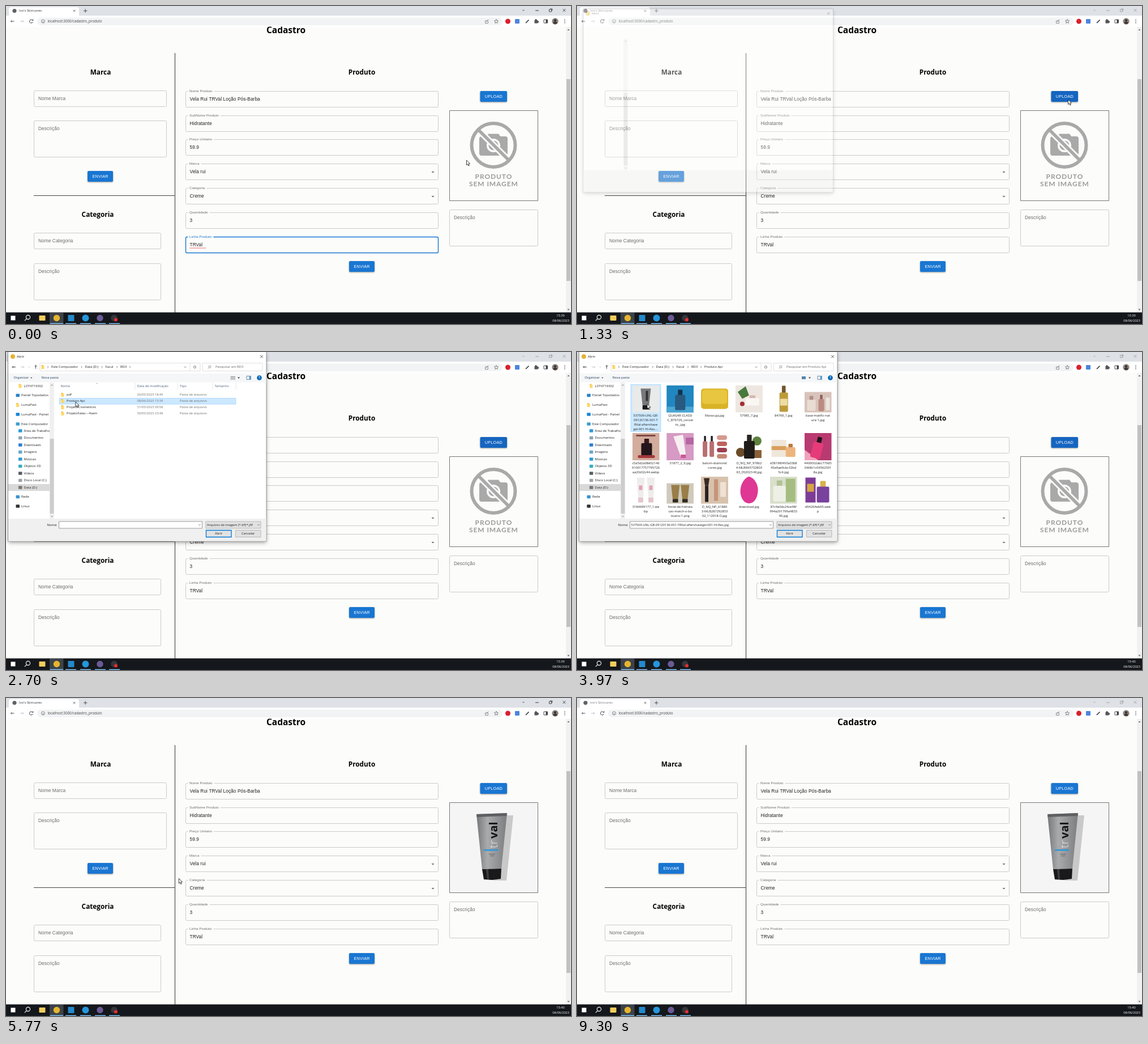
Animation, 998 px wide and 561 px high, one loop 9330 ms. Source, as an HTML page with a canvas:

```html
<!DOCTYPE html>
<html lang="pt">
<head>
<meta charset="utf-8">
<title>Cadastro</title>
<style>
html, body { margin: 0; width: 100%; height: 100%; overflow: hidden; background: #fff; }
canvas { display: block; width: 100vw; height: 100vh; }
</style>
</head>
<body>
<canvas id="stage" width="998" height="561"></canvas>
<script>
const stage = document.getElementById('stage').getContext('2d');
const layer = new OffscreenCanvas(998, 561).getContext('2d');
let g = stage; // surface the helpers draw on
const UI = '"Open Sans", "Noto Sans", sans-serif';
const FORM = '"Liberation Sans", Arial, sans-serif';
const PAPER = '#fcfcfa', EDGE = '#cbcbcb';
const LOOP = 9330;
const clamp = v => Math.max(0, Math.min(1, v));
const ease = v => v * v * (3 - 2 * v);

function text(s, x, y, size = 5.8, color = '#222', { font = UI, weight = 400, align = 'left', gap = 0 } = {}) {
  g.font = `${weight} ${size}px ${font}`;
  g.letterSpacing = gap + 'px';
  g.textAlign = align;
  g.textBaseline = 'middle';
  g.fillStyle = color;
  g.fillText(s, x, y + size * .07);
}
function rect(x, y, w, h, color, r = 0) {
  g.fillStyle = color;
  g.beginPath();
  g.roundRect(x, y, w, h, r);
  g.fill();
}
function frame(x, y, w, h, color, r = 0, width = 1) {
  g.strokeStyle = color;
  g.lineWidth = width;
  g.beginPath();
  g.roundRect(x, y, w, h, r);
  g.stroke();
}
function disc(x, y, r, color) {
  g.fillStyle = color;
  g.beginPath();
  g.arc(x, y, r, 0, 7);
  g.fill();
}
function trace(pts) {
  g.beginPath();
  for (let i = 0; i < pts.length; i += 2) g.lineTo(pts[i], pts[i + 1]);
}
function poly(color, ...pts) {
  trace(pts);
  g.fillStyle = color;
  g.fill();
}
function line(color, width, ...pts) {
  trace(pts);
  g.strokeStyle = color;
  g.lineWidth = width;
  g.stroke();
}
function shadowed(blur, dy, draw) {
  g.save();
  g.shadowColor = 'rgba(0,0,0,.4)';
  g.shadowBlur = blur;
  g.shadowOffsetY = dy;
  draw();
  g.restore();
}
// Chevron pointing along (dx, dy)
function chevron(x, y, dx, dy, color = '#555', s = 1.6) {
  line(color, .8, x - dx * s / 2 - dy * s, y - dy * s / 2 - dx * s, x + dx * s / 2, y + dy * s / 2,
    x - dx * s / 2 + dy * s, y - dy * s / 2 + dx * s);
}
function arrow(x, y, dx, dy, color) {
  line(color, .9, x - dx * 3, y - dy * 3, x + dx * 3, y + dy * 3);
  chevron(x + dx * 2, y + dy * 2, dx, dy, color, 2);
}
function cross(x, y, color, s = 2.4) {
  line(color, .8, x - s, y - s, x + s, y + s);
  line(color, .8, x + s, y - s, x - s, y + s);
}
function lens(x, y, r, color, width) {
  g.strokeStyle = color;
  g.lineWidth = width;
  g.beginPath();
  g.arc(x, y, r, 0, 7);
  g.stroke();
  line(color, width, x - r * .7, y + r * .7, x - r * 1.7, y + r * 1.7);
}
function folder(x, y) {
  rect(x - 2.5, y - 3.5, 3, 2, '#e0b23c');
  rect(x - 2.5, y - 2.5, 5, 6, '#ffd766', .5);
}

function browser(active) {
  const ink = active ? '#222' : '#999';
  rect(0, 0, 998, 18, '#dee1e6');
  rect(5, 2, 124, 18, '#fff', 4);
  rect(0, 17, 998, 19.5, '#fff');
  disc(15, 8.5, 3.6, '#5f6368');
  text("Ivo's Skincares", 23, 8.5, 6, active ? '#333' : '#777');
  cross(120.5, 8.5, '#444', 1.8);
  line('#444', .9, 137, 8.5, 143.5, 8.5);
  line('#444', .9, 140.2, 5.2, 140.2, 11.8);
  chevron(914, 7.5, 0, 1, ink);
  line(ink, .9, 935, 8, 941, 8);
  frame(959.5, 6, 4, 4, ink, 0, .8);
  line(ink, .8, 961, 5, 964.8, 5, 964.8, 8.5);
  cross(986, 7.5, ink);

  arrow(11.5, 27, -1, 0, '#444');
  arrow(28, 27, 1, 0, '#bbb');
  g.strokeStyle = '#444';
  g.lineWidth = 1;
  g.beginPath();
  g.arc(44.5, 27, 3, .3, 5.5);
  g.stroke();
  poly('#444', 45.5, 25.8, 48.3, 25.8, 48.3, 23);
  rect(55, 20.5, 822, 13.5, '#f1f3f4', 7);
  frame(62.5, 24, 6, 6, '#666', 3, .8);
  line('#666', .9, 65.5, 26.7, 65.5, 29);
  text('localhost:3000/cadastro_produto', 73.5, 27, 6.25, '#444');
  frame(846.5, 26, 5, 4.5, '#777', .5, .8);
  arrow(850, 26, .7, -.7, '#777');
  g.strokeStyle = '#666';
  g.beginPath();
  for (let i = 0; i < 10; i++) {
    const a = -Math.PI / 2 + i * Math.PI / 5, r = i % 2 ? 1.7 : 3.8;
    g.lineTo(866 + r * Math.cos(a), 27.2 + r * Math.sin(a));
  }
  g.closePath();
  g.stroke();
  disc(886.5, 27, 4.5, '#d9202e');
  rect(899, 23, 8, 8, '#4c84dd', 1);
  line('#333', 1.6, 918, 30, 923.5, 24.5);
  rect(933.5, 25, 6, 5.5, '#555', .5);
  disc(936, 24.5, 1.6, '#555');
  disc(940, 28, 1.4, '#555');
  frame(950, 24, 6.5, 6, '#444', .5, 1);
  rect(953.5, 24, 3, 6, '#444');
  disc(970, 27, 5.7, '#8b8580');
  disc(970, 25.5, 2.2, '#3d322e');
  rect(966.7, 28, 6.6, 3.5, '#3d322e', 2);
  for (const y of [24.3, 27, 29.7]) disc(987, y, .8, '#444');
}

function outlined(x, y, w, h, hint) {
  frame(x, y, w, h, EDGE, 2);
  text(hint, x + 7.5, y + 13.7, 8.3, '#6c6c6c', { font: FORM, gap: .08 });
}
function button(s, x, y, w, hover) {
  shadowed(2.5, 1, () => rect(x, y, w, 19, hover ? '#1565c0' : '#1976d2', 2));
  text(s, x + w / 2 + .1, y + 9.3, 7.3, '#fff', { font: FORM, align: 'center', gap: .2 });
}
function heading(s, x, y, size = 11.8) {
  text(s, x, y, size, '#000', { weight: 700, align: 'center' });
}

const fields = [
  ['Nome Produto', 'Vela Rui TRVal Loção Pós-Barba'], ['SubNome Produto', 'Hidratante'],
  ['Preço Unitario', '59.9'], ['Marca', 'Vela rui'], ['Categoria', 'Creme'],
  ['Quantidade', '3'], ['Linha Produto', 'TRVal']
];

function productField([label, value], i, focused) {
  const y = Math.round(149.8 + i * 42.8) + .5;
  frame(317.5, y, 446, 28, focused ? '#1976d2' : EDGE, 2, focused ? 1.4 : 1);
  g.font = `6.2px ${FORM}`;
  g.letterSpacing = '.06px';
  rect(321.5, y - 2, g.measureText(label).width + 5.5, 4, PAPER);
  text(label, 324, y - .3, 6.2, focused ? '#1976d2' : '#6c6c6c', { font: FORM, gap: .06 });
  text(value, 324.5, y + 14, 8.3, '#222', { font: FORM, gap: .08 });
  if (focused) line('#e04848', .8, 324.5, y + 19.5, 353, y + 19.5);
  if (i === 3 || i === 4) poly('#666', 751.5, y + 13.5, 756.5, y + 13.5, 754, y + 16);
}

function placeholder() {
  const grey = '#a9a9a9';
  rect(836, 230, 50, 34, grey, 4);
  poly(grey, 848, 231, 852, 225.5, 870, 225.5, 874, 231);
  disc(861, 246, 12, PAPER);
  disc(861, 246, 8.5, grey);
  line(PAPER, 11, 834, 218, 888, 272);
  line(grey, 5.5, 834, 218, 888, 272);
  g.lineWidth = 6;
  g.strokeStyle = grey;
  g.beginPath();
  g.arc(861, 245.5, 38.5, 0, 7);
  g.stroke();
  const style = { font: 'Lato, "Open Sans", sans-serif', weight: 700, align: 'center', gap: .9 };
  text('PRODUTO', 861.4, 300.5, 12, '#9b9b9b', style);
  text('SEM IMAGEM', 861.4, 314, 12, '#9b9b9b', style);
}

function product() {
  rect(783, 185, 157, 158, '#f5f5f5');
  poly('#c9c9c9', 880, 207, 896, 207, 884, 322, 862, 322);
  const metal = g.createLinearGradient(832, 0, 884, 0);
  metal.addColorStop(0, '#77797c');
  metal.addColorStop(.35, '#a9abad');
  metal.addColorStop(1, '#7c7e81');
  poly(metal, 831, 205, 885, 203, 875, 301, 841, 302);
  poly('#5d5f62', 831, 205, 885, 203, 884.5, 208, 831.6, 210);
  poly('#19191b', 841, 302, 875, 301, 874, 319, 859, 321, 844, 320);
  poly('#3d3e40', 848, 302, 852, 302, 853, 320, 850, 320);
  rect(844, 267, 25, 2.5, '#2997dc');
  rect(853, 275, 11, .8, '#555');
  rect(855, 278, 7, .8, '#555');
  g.save();
  g.translate(861, 265);
  g.rotate(-Math.PI / 2);
  text('tr', 0, 0, 20, '#e6e6e6', { weight: 300 });
  text('val', 17, 0, 20, '#151515', { weight: 700 });
  g.restore();
}

function page(t) {
  rect(0, 36, 998, 505, PAPER);
  heading('Cadastro', 494.5, 43, 15.5);
  line('#333', 1, 298.5, 83, 298.5, 541);
  line('#444', 1, 49, 334.5, 299, 334.5);
  heading('Marca', 167, 116.7);
  outlined(49.5, 149.5, 234, 28, 'Nome Marca');
  outlined(49.5, 202.5, 234, 64, 'Descrição');
  button('ENVIAR', 144, 291, 45);
  heading('Categoria', 162, 368.2);
  outlined(49.5, 400.5, 224, 28, 'Nome Categoria');
  outlined(49.5, 454.5, 224, 64, 'Descrição');
  heading('Produto', 628.5, 116.7);
  fields.forEach((f, i) => productField(f, i, i === 6 && t < 1130));
  button('ENVIAR', 606, 450, 45);
  button('UPLOAD', 837.5, 150, 47.5, t > 900 && t < 5520);
  t < 5600 ? placeholder() : product();
  frame(783.5, 184.5, 156, 159, '#777');
  outlined(783.5, 359.5, 156, 64, 'Descrição');
  rect(989, 37, 9, 504, '#f1f1f1');
  rect(990, 129, 7, 356, '#c1c1c1');
  poly('#666', 991.5, 43, 995.5, 43, 993.5, 40.5);
  poly('#666', 991.5, 534.5, 995.5, 534.5, 993.5, 537);
}

function taskbar(t) {
  rect(0, 540.5, 998, 21, '#14171b');
  rect(8.5, 546.5, 8, 8, '#fff');
  lens(39, 549, 3.6, '#fff', 1.1);
  rect(58.5, 546, 11, 9, '#f5cd5d', 1);
  rect(77, 541, 24.5, 20, '#3c4248');
  disc(89.5, 550.5, 5.7, '#e5b52f');
  rect(109.5, 545, 11, 11, '#2489ca', 1);
  disc(140.5, 550.5, 6, '#2396dd');
  disc(166, 550.5, 5.7, '#6a5a96');
  disc(191, 550.5, 5.7, '#34363a');
  disc(194, 553.5, 3, '#e52d32');
  [78, 105, 131, 157, 182].forEach((x, i) => rect(x, 559.5, i ? 19 : 23, 1.5, '#76b9ed'));
  text(t < 3400 ? '15:39' : '15:40', 979.5, 545.8, 5.6, '#fff', { align: 'center' });
  text('08/06/2023', 995, 554.8, 5.6, '#fff', { align: 'right' });
}

const tree = [
  [60, 'LOT4719302', '#ffd766', 1], [76.5, 'Painel Topodados', '#2b83c9'], [93.5, 'LumaPast', '#ffd766'],
  [110, 'LumaPast - Painel', '#1687d9'], [127, 'Este Computador', '#3f9fce'],
  [139, 'Área de Trabalho', '#2d9bd8', 1], [151.5, 'Documentos', '#8da5b5', 1], [164, 'Downloads', '#2c7fd0', 1],
  [176.5, 'Imagens', '#6aa6c9', 1], [189, 'Músicas', '#2d9bd8', 1], [201.5, 'Objetos 3D', '#37aebf', 1],
  [214, 'Vídeos', '#555e68', 1], [226.5, 'Disco Local (C:)', '#9aa3aa', 1], [239, 'Data (D:)', '#777', 1],
  [255.5, 'Rede', '#3a93d0'], [272, 'Linux', '#333']
];

function sidebar() {
  g.save();
  g.beginPath();
  g.rect(4, 54, 73, 239);
  g.clip();
  rect(4, 233, 73, 12, '#d9d9d9');
  for (const [y, name, color, nested] of tree) {
    const x = nested ? 25 : 20.5;
    color === '#ffd766' ? folder(x, y) : rect(x - 3, y - 2.8, 6.5, 5.6, color, 1);
    text(name, x + 6.5, y);
  }
  g.restore();
}

const folders = [['pdf', '26/05/2023 18:49'], ['Produto Api', '08/06/2023 15:39'],
  ['Projeto Cosmeticos', '31/05/2023 09:58'], ['ProjetoFatec---4sem', '30/05/2023 23:48']];

function folderList(t) {
  if (t > 2250) {
    rect(94.5, 81.5, 311.5, 10.5, '#cce8ff');
    frame(94.5, 81.5, 311.5, 10.5, '#99d1ff', 0, .7);
  }
  [['Nome', 96.5], ['Data de modificação', 231.5], ['Tipo', 307], ['Tamanho', 368.5]]
    .forEach(([s, x]) => text(s, x, 60.5, 5.8, '#4c607a'));
  for (const x of [228, 303.5, 365, 406]) line('#e3e3e3', .8, x, 54, x, 66);
  chevron(161, 55.5, 0, -1, '#888', 1.3);
  folders.forEach(([name, date], i) => {
    const y = 75.5 + 11 * i;
    folder(100, y);
    text(name, 107, y);
    text(date, 231.5, y, 5.65, '#6d6d6d');
    text('Pasta de arquivos', 307, y, 5.8, '#6d6d6d');
  });
}

// Small product shapes, in a 48 by 48 tile
function tube(x, y, w, h, body, cap) {
  poly(body, x, y, x + w, y, x + w * .82, y + h * .8, x + w * .18, y + h * .8);
  rect(x + w * .18, y + h * .8, w * .64, h * .2, cap, 1);
}
function bottle(x, y, w, h, body, cap) {
  rect(x + w * .28, y, w * .44, h * .3, cap, 1);
  rect(x, y + h * .26, w, h * .74, body, 2);
}
function sponge(color) {
  g.fillStyle = color;
  g.beginPath();
  g.moveTo(24, 0);
  g.bezierCurveTo(36, 4, 42, 18, 39, 31);
  g.bezierCurveTo(35, 53, 13, 53, 9, 31);
  g.bezierCurveTo(7, 18, 14, 3, 24, 0);
  g.fill();
}
const wide = color => rect(0, 12, 48, 36, color);
const tile = color => rect(0, 0, 48, 48, color);

const files = [
  ['537509-UNL-GB-|09120136-001-T|RVal-aftershave|gel-001-Hi-Res....', () => { tile('#e9eaea'); tube(15, 6, 18, 37, '#77797c', '#19191b'); rect(24, 10, 4, 18, '#333'); }],
  ['QUASAR-CLASSI|C_B76729_concei|to_.jpg', () => { tile('#2187c1'); rect(0, 38, 48, 10, '#4aa6d3'); bottle(15, 8, 18, 36, '#28597f', '#15324a'); }],
  ['Maracuja.jpg', () => { rect(0, 6, 48, 36, '#d9b326', 5); rect(2, 8, 44, 25, '#e8c63f', 5); }],
  ['57985_7.jpg', () => { tile('#eee7e1'); poly('#477a3d', 4, 12, 18, 2, 24, 18, 12, 24); disc(12, 33, 4, '#a52c36'); bottle(18, 18, 24, 18, '#faf6f2', '#d9b5ad'); }],
  ['84769_1.jpg', () => { bottle(17, 1, 15, 46, '#bd9b39', '#75552a'); rect(18, 24, 13, 12, '#eddca3'); }],
  ['base-matific-nat|ura-1.jpg', () => { wide('#d8c3bb'); bottle(5, 19, 15, 26, '#e9ddd3', '#b08d86'); bottle(25, 17, 10, 29, '#bc8b80', '#8a5f5b'); rect(38, 22, 7, 22, '#ece4df'); }],
  ['c5a5d2a08e52146|910017757795726|aa20c02c44.webp', () => { tile('#d3ac9d'); rect(7, 3, 34, 3, '#7f4a42'); bottle(16, 10, 19, 30, '#23151a', '#33191d'); rect(10, 39, 30, 5, '#a5363d', 2); }],
  ['51877_2_9.jpg', () => { tile('#d69ac4'); poly('#f7f0f1', 12, 6, 29, 3, 34, 39, 25, 42); rect(25, 38, 9, 6, '#c95a98'); rect(34, 8, 14, 12, '#b565a1'); }],
  ['batom-diamond|-cores.jpg', () => { [3, 15].forEach(x => bottle(x, 5, 8, 37, '#b86f70', '#242024')); ['#d59a8e', '#bd625f', '#9c4050', '#c78976'].forEach((c, i) => rect(28, 4 + i * 11, 18, 8, c, 4)); }],
  ['D_NQ_NP_97862|4-MLB693732803|63_052023-W.jpg', () => { disc(9, 34, 8, '#6b4b28'); disc(38, 14, 8, '#5d813e'); bottle(15, 3, 19, 42, '#1e1b18', '#292522'); rect(34, 30, 12, 14, '#8a6036'); }],
  ['d38198f493a03b8|40a9ae9cbc32bd|5c4.jpg', () => { rect(3, 12, 26, 30, '#efe7da'); rect(3, 23, 26, 7, '#d9a05d'); bottle(28, 19, 17, 23, '#edb47d', '#b97941'); }],
  ['4400002abc770d5|0468c1c04562501|8a.jpg', () => { tile('#b83a70'); poly('#f0a1bc', 0, 29, 25, 48, 0, 48); g.rotate(.25); bottle(20, 0, 18, 38, '#e53b79', '#241419'); }],
  ['3184699177_1.we|bp', () => { [8, 26].forEach(x => { tube(x, 2, 14, 44, '#efedec', '#e3c7cd'); rect(x + 4, 16, 6, 8, '#dfa3b7'); }); }],
  ['fonte-de-hidrata|cao-match-o-bo|ticario-1.png', () => { wide('#cfcabd'); [8, 25].forEach(x => tube(x, 15, 15, 31, '#997e49', '#30291f')); }],
  ['D_NQ_NP_61880|3-MLB287292853|02_112018-O.jpg', () => { tile('#d7c2ad'); poly('#3a2922', 5, 3, 15, 3, 13, 16, 7, 16); rect(7, 16, 6, 29, '#292021'); rect(23, 5, 7, 38, '#c7947a'); rect(34, 10, 10, 26, '#efe2d4'); }],
  ['download.jpg', () => sponge('#df3794')],
  ['87c9e0dc24ce48f|994a291799a4833|90.jpg', () => { tile('#d8dfcb'); rect(28, 4, 17, 41, '#a6bd82'); bottle(6, 7, 22, 37, '#eef0e6', '#b4c197'); }],
  ['d94264eb95.web|p', () => { rect(2, 2, 18, 44, '#7d3c96'); rect(5, 13, 12, 14, '#d4a740'); bottle(22, 8, 22, 38, '#78429d', '#d9b14c'); }]
];

function fileGrid(t) {
  const picked = t > 3350;
  if (picked) {
    const focused = t < 5150;
    rect(95, 57.5, 53, 83, focused ? '#cce8ff' : '#d9d9d9');
    if (focused) frame(95, 57.5, 53, 83, '#99d1ff', 0, .7);
  }
  g.save();
  g.beginPath();
  g.rect(86, 54, 373, 239.5);
  g.clip();
  files.forEach(([name, draw], i) => {
    const x = 121.5 + 60.8 * (i % 6), row = Math.floor(i / 6), y = [58.5, 143, 219.5][row];
    g.save();
    g.translate(x - 24, y);
    g.beginPath();
    g.rect(0, 0, 48, 48);
    g.clip();
    draw();
    g.restore();
    name.split('|').forEach((s, k) => text(s, x, y + 53.6 + 8 * k, 5.7, '#222', { align: 'center' }));
  });
  g.restore();
}

function dialogBar(inside) {
  arrow(14, 26.5, -1, 0, '#333');
  arrow(29, 26.5, 1, 0, '#c5c5c5');
  chevron(41, 26.5, 0, 1, '#bbb', 1.3);
  arrow(52.5, 26.5, 0, -1, '#333');
  frame(60, 19.5, 283, 14, '#d9d9d9', 0, .8);
  folder(65, 26.5);
  [[80, 'Este Computador'], [139.5, 'Data (D:)'], [175.5, 'Facul'], [202, 'BD3']].forEach(([x, s]) => {
    chevron(x - 6, 26.5, 1, 0);
    text(s, x, 26.5);
  });
  chevron(219, 26.5, 1, 0);
  if (inside) text('Produto Api', 225, 26.5);
  chevron(316.5, 26.5, 0, 1);
  line('#d9d9d9', .8, 325, 20, 325, 33);
  frame(331.5, 24.5, 4, 4, '#555', 2, .8);
  frame(347.5, 19.5, 105.5, 14, '#d9d9d9', 0, .8);
  lens(360, 26, 2, '#777', .7);
  text('Pesquisar em ' + (inside ? 'Produto Api' : 'BD3'), 370, 26.5, 5.8, '#666');

  rect(4, 38, 455.5, 15.5, '#f5f6f7');
  text('Organizar', 13.5, 45.5, 5.8, '#1e395b');
  text('Nova pasta', 62.5, 45.5, 5.8, '#1e395b');
  poly('#444', 43, 44.8, 46.5, 44.8, 44.8, 46.8);
  if (inside) rect(397, 43, 7, 5, '#5785aa');
  else for (const y of [43.5, 45.7, 48]) line('#777', .9, 396.5, y, 405, y);
  poly('#333', 409, 44.5, 413, 44.5, 411, 47);
  frame(425, 42.5, 7.5, 6, '#4775a0', 0, .8);
  rect(429.5, 42.5, 3, 6, '#5f9fd1');
  disc(447.5, 45.5, 4.3, '#0067b8');
  text('?', 447.5, 45.5, 6, '#fff', { weight: 700, align: 'center' });
}

function dialogBody(t) {
  const inside = t > 2950, loaded = t > 1550, left = t > 5150;
  shadowed(7, 2, () => rect(3.5, 0, 456.5, 334, '#fff'));
  frame(3.5, -.5, 456.5, 334.5, '#8c8c8c', 0, .9);
  if (!left) disc(12, 8, 4, '#e3b433');
  text('Abrir', left ? 8.5 : 19, 8);
  cross(451.5, 8, '#333');
  rect(77, 54, 8, 240, '#f0f0f0');
  rect(77.5, 153, 7, 132, '#cdcdcd');
  chevron(81, 58.5, 0, -1);
  chevron(81, 290, 0, 1);
  rect(4, 294, 455.5, 39.5, '#f0f0f0');
  if (!loaded) return;
  dialogBar(inside);
  sidebar();
  inside ? fileGrid(t) : folderList(t);
  text('Nome:', 90.5, 305, 5.8, '#222', { align: 'right' });
  rect(93.5, 299, 253, 12, '#fff');
  frame(93.5, 299, 253, 12, '#858585', 0, .8);
  chevron(342, 305, 0, 1);
  rect(353, 299, 97, 12, '#e1e1e1');
  frame(353, 299, 97, 12, '#adadad', 0, .8);
  chevron(446, 305, 0, 1);
  if (t > 3350) {
    if (left) rect(94.5, 301, 191.5, 8.5, '#0078d7');
    text('537509-UNL-GB-09120136-001-TRVal-aftershavegel-001-Hi-Res.jpg', 95.5, 305, 5.6, left ? '#fff' : '#222');
  }
  text('Arquivos de imagem (*.tiff;*.jfif', 355, 305, 5.6);
  const hover = t > 4850;
  rect(353.5, 314.5, 44.5, 12, hover ? '#cce4f7' : '#e1e1e1');
  frame(353.5, 314.5, 44.5, 12, '#0078d7', 0, hover ? .9 : 1.3);
  rect(405.5, 314.5, 44.5, 12, '#e1e1e1');
  frame(405.5, 314.5, 44.5, 12, '#adadad', 0, .8);
  text('Abrir', 375.7, 320.5, 5.8, '#222', { align: 'center' });
  text('Cancelar', 427.7, 320.5, 5.8, '#222', { align: 'center' });
}

// The window fades as one sheet while it grows or shrinks about its centre
function dialog(t) {
  const show = clamp((t - 1260) / 200) * (1 - clamp((t - 5330) / 150));
  if (!show) return;
  const k = .95 + .05 * show;
  g = layer;
  g.clearRect(0, 0, 998, 561);
  g.save();
  g.translate(231.7, 167);
  g.scale(k, k);
  g.translate(-231.7, -167);
  dialogBody(t);
  g.restore();
  g = stage;
  g.globalAlpha = show;
  g.drawImage(layer.canvas, 0, 0);
  g.globalAlpha = 1;
}

// Pointer stops: arrival time, x, y
const stops = [[0, 813.5, 272], [250, 813.5, 272], [1000, 867.5, 165], [1500, 867.5, 165], [2400, 123, 88],
  [3000, 123, 88], [3400, 124, 91.5], [4150, 124, 91.5], [4950, 377, 322.5], [5500, 377, 322.5], [6500, -20, 300]];

function pointer(t) {
  const i = stops.findIndex(s => s[0] > t);
  if (i < 1) return;
  const [t0, x0, y0] = stops[i - 1], [t1, x1, y1] = stops[i];
  const p = ease((t - t0) / (t1 - t0));
  g.save();
  g.translate(x0 + (x1 - x0) * p, y0 + (y1 - y0) * p);
  const shape = [0, 0, 0, 8.6, 2, 6.8, 3.4, 10, 4.9, 9.3, 3.5, 6.3, 6, 6.1, 0, 0];
  poly('#fff', ...shape);
  line('#111', .8, ...shape);
  g.restore();
}

function draw(now) {
  const t = now % LOOP;
  page(t);
  browser(t < 1200 || t > 5330 && t < 8900);
  taskbar(t);
  dialog(t);
  pointer(t);
  requestAnimationFrame(draw);
}
requestAnimationFrame(draw);
</script>
</body>
</html>
```
